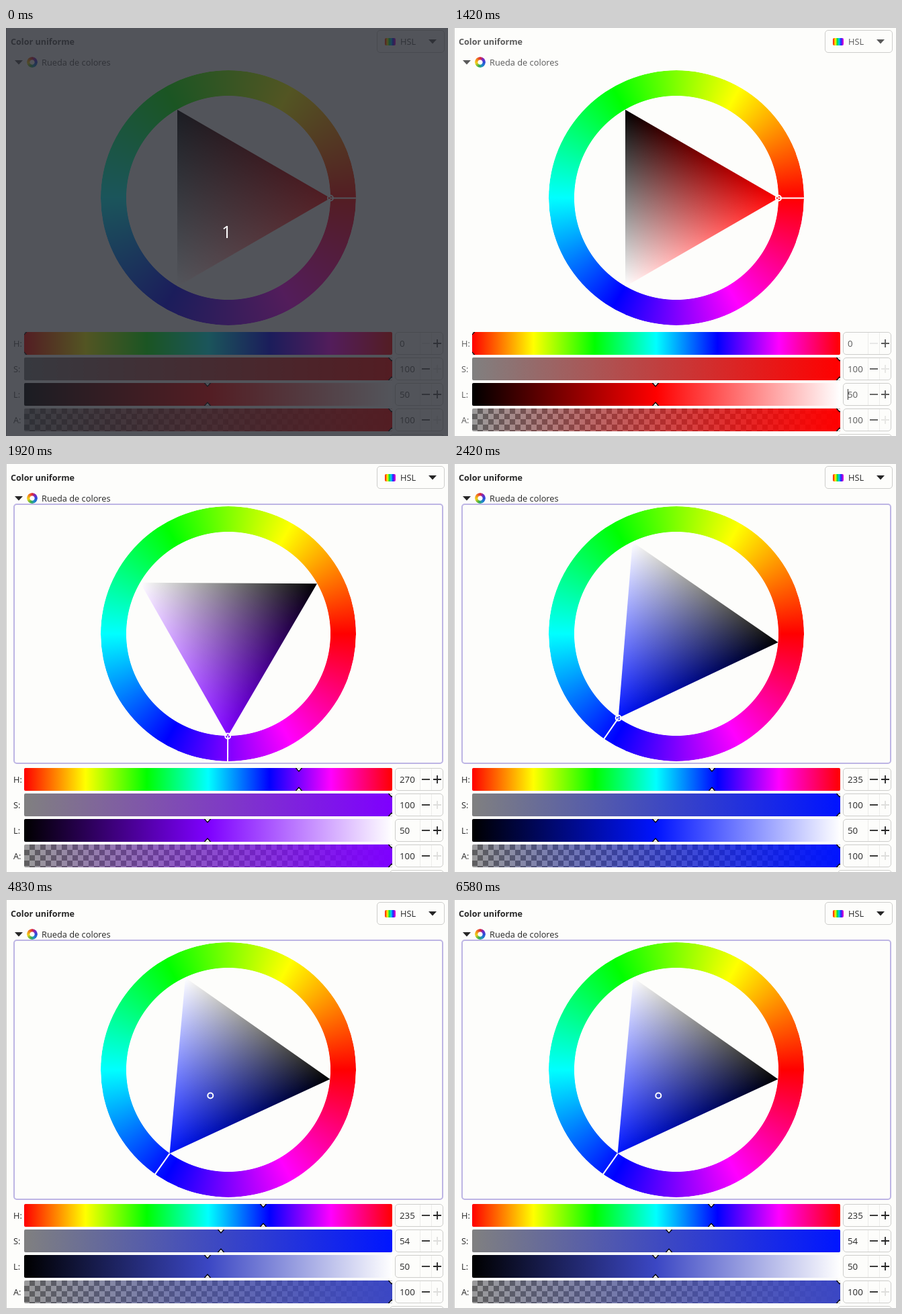
Animation, 658 px wide and 608 px high, one loop 8 s. Source, as an HTML page with a canvas:

```html
<!DOCTYPE html>
<html lang="es">
<head>
<meta charset="utf-8">
<title>Color uniforme</title>
<style>
html, body { margin: 0; width: 658px; height: 608px; overflow: hidden; }
body {
  position: relative; background: #fdfdfb; color: var(--ink);
  font: 12.8px/18px "Open Sans", "Noto Sans", sans-serif; white-space: nowrap;
}
body * { position: absolute; box-sizing: border-box; }
svg { overflow: visible; }
.edge { left: 0; top: 0; width: 1px; height: 608px; background: #cfcfcd; }
.title { left: 7px; top: 12px; font-weight: 700; font-size: 12.6px; }
.box { border: 1px solid #cdcdcb; border-radius: 5px; }
.menu { left: 552px; top: 3px; width: 101px; height: 34px; }
.chip {
  left: 564px; top: 15px; width: 16px; height: 11px; border-radius: 2px;
  background: linear-gradient(90deg, red, #ff0 25%, #0d4 42%, #0cf 58%, #22f 76%, #f0c);
}
.icon {
  left: 31px; top: 43px; width: 16px; height: 16px; border-radius: 50%;
  background: conic-gradient(#e0263a, #7a2bc4 12%, #2b49d8 25%, #1f8fc9 42%, #35b04a 55%, #f2d21b 72%, #f08a1b 86%, #e0263a);
  -webkit-mask: radial-gradient(circle, transparent 3.2px, #000 4px);
  mask: radial-gradient(circle, transparent 3.2px, #000 4px);
}
#focus { left: 11px; top: 59px; width: 640px; height: 388px; border: 2px solid #bdb5e4; border-radius: 5px; }
.ring {
  left: 141px; top: 63px; width: 380px; height: 380px; border-radius: 50%;
  background: conic-gradient(from 90deg, red, #f0f, #00f, #0ff, #0f0, #ff0, red);
  -webkit-mask: radial-gradient(circle, transparent 151.6px, #000 152.4px);
  mask: radial-gradient(circle, transparent 151.6px, #000 152.4px);
}
canvas { left: 0; top: 0; }
.row { left: 0; width: 658px; height: 34px; }
.name { left: 11px; top: 8px; }
.bar { left: 27px; top: 0; width: 548px; height: 34px; border-radius: 2px; overflow: hidden; }
.spin { left: 579px; top: 0; width: 72px; height: 34px; }
.value { left: 586px; top: 8px; font-size: 13.3px; font-weight: 500; }
.row > svg { left: 0; top: 0; }
.H .bar { background: linear-gradient(90deg, red, #ff0, #0f0, #0ff, #00f, #f0f, red); }
.S .bar { background: linear-gradient(90deg, #808080, var(--pure)); }
.L .bar { background: linear-gradient(90deg, #000, var(--color), #fff); }
.A .bar {
  background: linear-gradient(90deg, transparent, var(--color)),
    repeating-conic-gradient(#5f5f5f 0 25%, #9a9a9a 0 50%) 0 0 / 16px 16px;
}
#caret { left: 586px; top: 538px; width: 1px; height: 16px; background: #333; }
#tip {
  height: 43px; padding: 12px 13px; border-radius: 5px;
  background: rgba(10, 8, 10, .87); color: #fff; font-size: 12.65px;
}
#dim { inset: 0; background: rgba(35, 38, 45, .78); }
#dim span { left: 321px; top: 284px; font-size: 26px; line-height: 38px; color: #fff; }
</style>
</head>
<body>
<div class="edge"></div>
<div class="title">Color uniforme</div>
<div class="box menu"></div>
<div class="chip"></div>
<div style="left:587px;top:11px">HSL</div>
<svg width="658" height="60" fill="currentColor">
  <path d="M629 17H641L635 23.5ZM13 48H25L19 54.5Z"/>
</svg>
<div class="icon"></div>
<div style="left:53px;top:42px">Rueda de colores</div>
<div id="focus"></div>
<div class="ring"></div>
<canvas width="658" height="608"></canvas>
<div id="rows"></div>
<div class="box" style="left:571px;top:605px;width:81px;height:34px"></div>
<div id="caret"></div>
<div id="tip"></div>
<div id="dim"><span>1</span></div>

<script>
const LOOP = 8000;
const CX = 331, CY = 253.5, INNER = 152, OUTER = 190;
const $ = id => document.getElementById(id);
const ctx = document.querySelector('canvas').getContext('2d');

// start time, hue, saturation
const poses = [
  [0, 0, 1], [1830, 269.7, 1], [2420, 235.4, 1],
  [2500, 234.2, 1], [3170, 234.9, 1], [4830, 234.9, .537]
];
// start, end, left, top, label
const tips = [
  [80, 420, 275, 568, 'Luminancia'],
  [5330, 5580, 245, 530, 'Saturación'],
  [6000, 6080, 263, 606, 'Transparencia'],
  [6330, 6580, 235, 492, 'Tono']
];
const inks = [[0, '#5a5a5a'], [1830, '#2b2b2b'], [1920, '#262626']];
const plusFade = [[4830, 0], [4920, .4], [5000, .8], [5080, 1]];

const at = (list, t) => list.filter(step => step[0] <= t).pop();

const rows = [...'HSLA'].map((name, i) => {
  const el = document.createElement('div');
  el.className = 'row ' + name;
  el.style.top = 453 + 38 * i + 'px';
  el.innerHTML = `<div class="name">${name}:</div>
    <div class="bar"><svg width="12" height="34"><path fill="#fff" stroke="#000" stroke-width="1.3"
      d="M1 -.5H11L6 5ZM1 34.5H11L6 29Z"/></svg></div>
    <div class="box spin"></div><div class="value"></div>
    <svg width="658" height="34" fill="none">
      <path d="M616.5 1V33M633.5 1V33" stroke="#ececea"/>
      <path class="minus" d="M619 17H631" stroke="currentColor" stroke-width="1.8"/>
      <path class="plus" d="M636 17H648M642 11V23" stroke="currentColor" stroke-width="1.8"/>
    </svg>`;
  $('rows').append(el);
  const get = q => el.querySelector(q);
  return { mark: get('.bar svg'), value: get('.value'), minus: get('.minus'), plus: get('.plus') };
});

function setRow(row, part, label) {
  row.mark.style.left = part * 547.3 - 6.7 + 'px';
  row.value.textContent = label;
  row.minus.style.opacity = part > 0 ? 1 : .14;
  row.plus.style.opacity = part < 1 ? 1 : .14;
}

function polar(deg, r) {
  const a = deg * Math.PI / 180;
  return [CX + r * Math.cos(a), CY - r * Math.sin(a)];
}

function fillStage(paint, mode) {
  ctx.globalCompositeOperation = mode;
  ctx.fillStyle = paint;
  ctx.fillRect(0, 0, 658, 608);
}

function drawTriangle(hue, sat) {
  // Pure hue and white, each fading to the opposite side, added together
  fillStage('#000', 'copy');
  for (const [deg, color] of [[0, `hsl(${hue},100%,50%)`], [240, '#fff']]) {
    const g = ctx.createLinearGradient(...polar(hue + deg, INNER), ...polar(hue + deg + 180, INNER / 2));
    g.addColorStop(0, color);
    g.addColorStop(1, '#000');
    fillStage(g, 'lighter');
  }
  // Keep only the triangle
  ctx.globalCompositeOperation = 'destination-in';
  ctx.beginPath();
  [0, 120, 240].forEach(d => ctx.lineTo(...polar(hue + d, INNER)));
  ctx.fill();
  ctx.globalCompositeOperation = 'source-over';

  ctx.strokeStyle = '#fff';
  ctx.lineWidth = 2;
  ctx.beginPath();
  ctx.moveTo(...polar(hue, INNER));
  ctx.lineTo(...polar(hue, OUTER));
  ctx.stroke();
  // At half lightness the knob lies on the axis towards the pure hue
  ctx.beginPath();
  ctx.arc(...polar(hue, INNER * (1.5 * sat - .5)), 4, 0, 7);
  ctx.stroke();
}

let lastPose;
function setPose(pose) {
  if (pose === lastPose) return;
  lastPose = pose;
  const [, hue, sat] = pose;
  const root = document.body.style;
  root.setProperty('--pure', `hsl(${hue},100%,50%)`);
  root.setProperty('--color', `hsl(${hue},${sat * 100}%,50%)`);
  drawTriangle(hue, sat);
  setRow(rows[0], hue / 360, Math.round(hue));
  setRow(rows[1], sat, Math.round(sat * 100));
  setRow(rows[2], .5, 50);
  setRow(rows[3], 1, 100);
}

const show = (el, on) => { el.style.visibility = on ? 'visible' : 'hidden'; };

function render() {
  const t = performance.now() % LOOP;
  setPose(at(poses, t));
  document.body.style.setProperty('--ink', at(inks, t)[1]);
  const fade = at(plusFade, t);
  rows[1].plus.style.opacity = .14 + .86 * (fade ? fade[1] : 0);

  show($('dim'), t < 80);
  show($('focus'), t >= 1830);
  show($('caret'), t >= 1420 && t < 1830);
  const tip = tips.find(([from, to]) => t >= from && t < to);
  show($('tip'), tip);
  if (tip) {
    const [, , x, y, label] = tip;
    $('tip').style.left = x + 'px';
    $('tip').style.top = y + 'px';
    $('tip').textContent = label;
  }
  requestAnimationFrame(render);
}
render();
</script>
</body>
</html>
```
